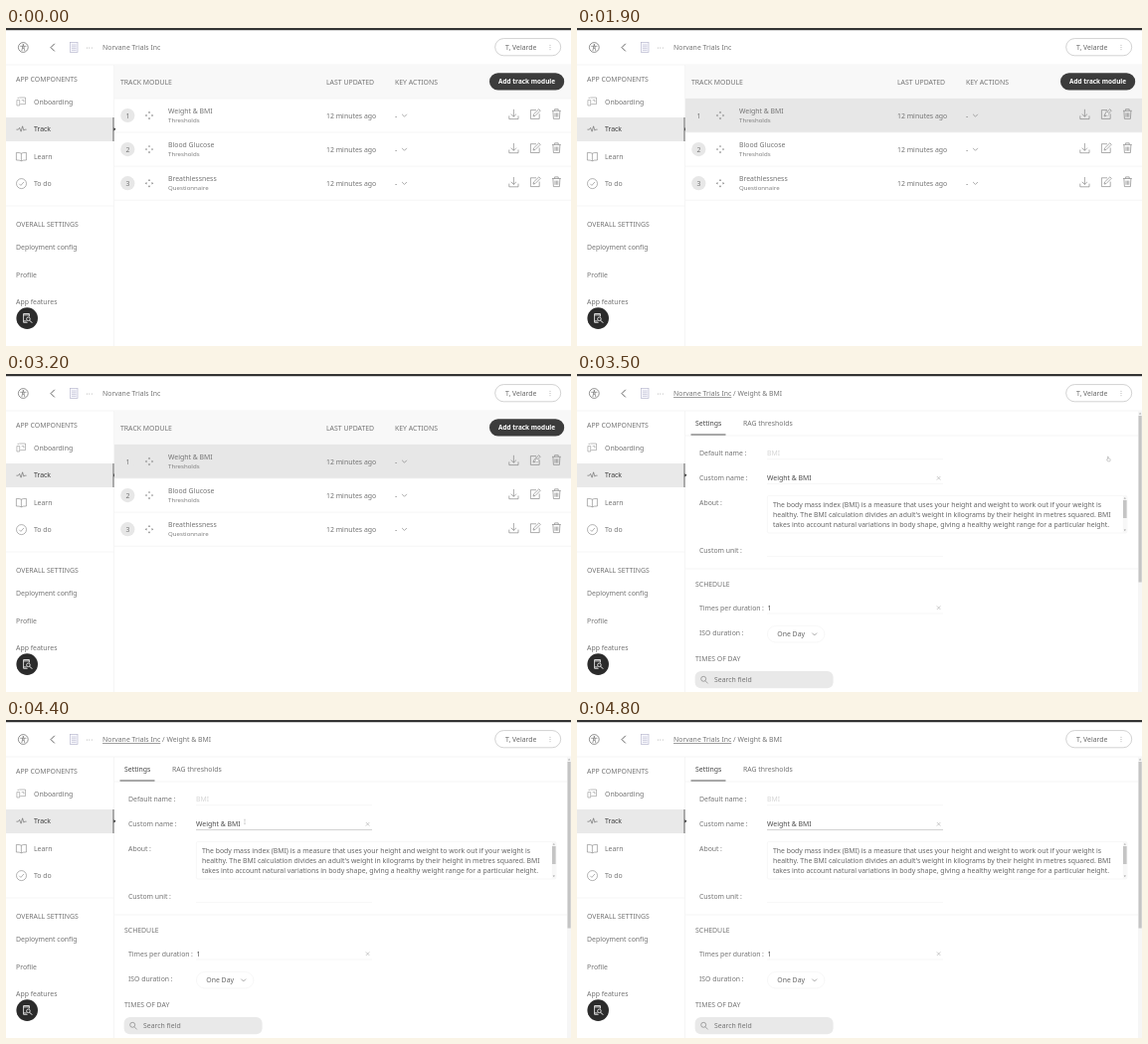
Write an HTML page that moves like this. It is 568 px wide and 320 px high and loops after 5000 ms.

```html
<!DOCTYPE html>
<html lang="en">
<head>
<meta charset="utf-8">
<title>Track modules</title>
<style>
html, body { margin: 0; width: 100%; height: 100%; overflow: hidden; background: #fff; }
svg { display: block; width: 100vw; height: 100vh; }
text { font: 6.9px "Noto Sans", "Open Sans", sans-serif; white-space: pre; }
</style>
</head>
<body>
<svg id="stage" viewBox="0 0 568 320"></svg>
<script>
const stage = document.getElementById('stage');
const LOOP = 5000, STEP = 100;
const ORG = 'Norvane Trials Inc', USER = 'T, Velarde';
const GREY = '#747474', DARK = '#4c4c4c', RULE = '#f1f1f1';

function add(parent, tag, attrs, content) {
  const el = document.createElementNS('http://www.w3.org/2000/svg', tag);
  for (const key in attrs) el.setAttribute(key, attrs[key]);
  if (content !== undefined) el.textContent = content;
  parent.appendChild(el);
  return el;
}
const group = (parent, x = 0, y = 0) => add(parent, 'g', { transform: `translate(${x} ${y})` });
const rect = (g, x, y, width, height, fill, more) => add(g, 'rect', { x, y, width, height, fill, ...more });
const disc = (g, cx, cy, r, fill, more) => add(g, 'circle', { cx, cy, r, fill, ...more });
const stroke = (g, d, color = GREY, width = 0.6, more) =>
  add(g, 'path', { d, fill: 'none', stroke: color, 'stroke-width': width, ...more });
const label = (g, x, y, text, color = GREY, size = 6.9, more = '') =>
  add(g, 'text', { x, y, style: `fill:${color};font-size:${size}px;${more}` }, text);
const field = (g, y, name) => add(label(g, 123, y, name), 'tspan', { dx: 1.5 }, ':');
const show = (el, on) => el.setAttribute('visibility', on ? 'visible' : 'hidden');
const rule = (g, x1, x2, y, color = RULE, width = 0.7) => stroke(g, `M${x1} ${y}H${x2}`, color, width);
const chevron = (g, x, y) => stroke(g, `M${x - 2.4} ${y - 1.2}l2.4 2.4 2.4-2.4`);
const cross = (g, x, y) => stroke(g, `M${x - 1.8} ${y - 1.8}l3.6 3.6m0-3.6l-3.6 3.6`, '#999', 0.5);

function drawHeader() {
  rect(stage, 0, 0, 568, 2.2, '#333');
  rule(stage, 0, 568, 37);
  const a = group(stage, 17.3, 19.5);
  disc(a, 0, 0, 4.9, 'none', { stroke: '#555', 'stroke-width': 0.65 });
  disc(a, 0, -2.6, 0.75, '#555');
  stroke(a, 'M-3.1-1.2H3.1M-.8-1.2V.6L-1.5 3.5M.8-1.2V.6L1.5 3.5M-.8 .8H.8', '#555', 0.55);
  stroke(stage, 'M48.8 15.8l-3.8 3.8 3.8 3.8', '#444', 0.85);
  rect(stage, 64.6, 14.6, 7.4, 9.8, '#f7f7fc', { stroke: '#b0b0c8', 'stroke-width': 0.6 });
  stroke(stage, 'M66 17h4.6m-4.6 1.8h4.6m-4.6 1.8h4.6m-4.6 1.8h4.6', '#a8a8c4', 0.5);
  for (const x of [81.4, 83.8, 86.2]) disc(stage, x, 20, 0.45, GREY);
  rect(stage, 491.7, 10.6, 66, 17.2, '#fff', { rx: 8.6, stroke: '#b4b4b4', 'stroke-width': 0.6 });
  label(stage, 502, 22, USER, '#666');
  for (const y of [17.3, 19.5, 21.7]) disc(stage, 547, y, 0.45, GREY);
}

function drawSidebar() {
  rule(stage, 0, 108, 179);
  stroke(stage, 'M108.5 37V320', RULE, 0.7);
  rect(stage, 0, 90, 108, 24, '#e9e9e9');
  rect(stage, 107.6, 90, 0.8, 24, '#444');
  add(stage, 'path', { d: 'M108.4 100.2l2 1.6-2 1.6z', fill: '#222' });
  label(stage, 10, 54.1, 'APP COMPONENTS');
  label(stage, 28, 76.8, 'Onboarding');
  label(stage, 28, 104.4, 'Track', '#3c3c3c');
  label(stage, 28, 132, 'Learn');
  label(stage, 28, 159.2, 'To do');
  label(stage, 10, 200.2, 'OVERALL SETTINGS');
  label(stage, 10, 222.7, 'Deployment config');
  label(stage, 10, 250.5, 'Profile');
  label(stage, 10, 278, 'App features');

  const board = group(stage, 15.3, 74);
  stroke(board, 'M-2-4H4.2V2.6H-1M-4.4-1.4h2.8v5.4h-2.8zM-3.8-3.6h1.6M.4-1.4h2.2v2', '#888', 0.55);
  stroke(stage, 'M10.4 102.2h2l1.2-1.8 1.5 3.8 1.5-5.4 1.3 4.4.8-1h1.9', '#555', 0.55);
  stroke(stage, 'M15.4 126.2q-2-1-5-.8v7.6q3-.2 5 .8q2-1 5-.8v-7.6q-3-.2-5 .8zV133.8', GREY, 0.55);
  disc(stage, 15.5, 156.6, 5, 'none', { stroke: GREY, 'stroke-width': 0.55 });
  stroke(stage, 'M13.3 156.8l1.6 1.6 3-3.4', GREY, 0.55);

  disc(stage, 21.2, 292.1, 10.8, '#2b2b2b');
  const phone = group(stage, 21.2, 292.1);
  stroke(phone, 'M2.2-1.6V-4.6H-3.6V4.2H.4M-3.6-3.2H2.2M-3.6 2.8H-.4', '#fff', 0.8);
  disc(phone, 1.2, 0.7, 1.8, 'none', { stroke: '#fff', 'stroke-width': 0.8 });
  stroke(phone, 'M2.5 2.1l2.5 2.5', '#fff', 1);
}

function drawRow(list, i, title, kind) {
  const g = group(list, 0, 71 + i * 34.1);
  const hover = rect(g, 109, 0, 459, 34, '#e7e7e7', { opacity: 0 });
  rule(g, 109, 568, 34);
  disc(g, 122.3, 17, 7.1, '#e7e7e7');
  label(g, 120.4, 19.5, i + 1);
  for (const turn of [0, 90, 180, 270])
    add(g, 'path', { d: 'M0-4.2l1.2 1.7h-2.4z', fill: '#808080', transform: `translate(144 17) rotate(${turn})` });
  label(g, 163, 14.5, title);
  label(g, 163, 24, kind, '#808080', 6.1);
  label(g, 322, 19.5, '12 minutes ago');
  label(g, 391, 19.5, '-');
  chevron(g, 400.5, 17);
  stroke(g, 'M510.4 10.8v7.4m-2.6-2.6l2.6 2.6 2.6-2.6M505.8 17.4v3.2h9.2v-3.2');
  stroke(g, 'M533 11.6H527.4V20.4H536.2V15.4M530 17.9l.6-2.2 5.2-5 1.4 1.5-5.1 5.1z');
  stroke(g, 'M549 12.3h8.8M551.6 12.2v-1.5h3.6v1.5M549.9 12.4l.5 8h6l.5-8M552 14.4v4.2m1.4-4.2v4.2m1.4-4.2v4.2');
  return hover;
}

function drawList() {
  const g = group(stage);
  label(g, 97, 22, ORG);
  rect(g, 109, 37.3, 459, 33.7, '#f8f8f8');
  rule(g, 109, 568, 71);
  label(g, 115, 56.5, 'TRACK MODULE');
  label(g, 322, 56.5, 'LAST UPDATED');
  label(g, 391, 56.5, 'KEY ACTIONS');
  rect(g, 486, 45.2, 75.2, 17.4, '#3c3c3c', { rx: 8.7 });
  label(g, 523.6, 56.3, 'Add track module', '#fff', 6.45, 'font-weight:700;text-anchor:middle');
  const hovers = [['Weight & BMI', 'Thresholds'], ['Blood Glucose', 'Thresholds'], ['Breathlessness', 'Questionnaire']]
    .map(([title, kind], i) => drawRow(g, i, title, kind));
  return { g, hovers };
}

function drawForm() {
  const g = group(stage);
  const crumb = label(g, 97, 22, '');
  add(crumb, 'tspan', { 'text-decoration': 'underline' }, ORG);
  add(crumb, 'tspan', {}, ' / Weight & BMI');

  label(g, 119, 52.2, 'Settings', '#444');
  label(g, 167, 52.2, 'RAG thresholds');
  rule(g, 109, 564, 62);
  rule(g, 114.5, 149.5, 61, '#555', 1);

  field(g, 82, 'Default name');
  label(g, 191, 82, 'BMI', '#d4d4d4');
  field(g, 107.3, 'Custom name');
  label(g, 191, 107.3, 'Weight & BMI', DARK);
  field(g, 131.6, 'About');
  field(g, 180.3, 'Custom unit');
  for (const y of [85.7, 110.5, 183.6, 241]) rule(g, 191, 368, y, RULE, 0.6);
  const focus = rule(g, 191, 368, 110.5, '#bbb', 0.6);
  cross(g, 363.6, 104.8);

  rect(g, 191.4, 122.4, 361.6, 37.6, 'none', { rx: 1.5, stroke: RULE, 'stroke-width': 0.6 });
  ['The body mass index (BMI) is a measure that uses your height and weight to work out if your weight is',
   "healthy. The BMI calculation divides an adult's weight in kilograms by their height in metres squared. BMI",
   'takes into account natural variations in body shape, giving a healthy weight range for a particular height.'
  ].forEach((line, i) => label(g, 197, 133.6 + i * 10.4, line, '#666', 6.89));
  rect(g, 548.8, 122.8, 4, 36.8, '#f7f7f7');
  rect(g, 549, 127, 3.6, 18, '#c4c4c4');
  add(g, 'path', { d: 'M549.7 125.6h2.2l-1.1-1.4zM549.7 156.6h2.2l-1.1 1.4z', fill: '#999' });

  rule(g, 109, 564, 196);
  label(g, 119, 214.3, 'SCHEDULE');
  field(g, 238, 'Times per duration');
  label(g, 191.4, 238, '1', DARK);
  cross(g, 363.6, 235.2);
  field(g, 263, 'ISO duration');
  rect(g, 191.4, 253.6, 57.4, 16.4, '#fff', { rx: 8.2, stroke: RULE, 'stroke-width': 0.6 });
  label(g, 201.3, 264.3, 'One Day', '#666');
  chevron(g, 238.7, 261.8);
  label(g, 119, 289.1, 'TIMES OF DAY');
  rect(g, 118.6, 299, 139, 17.2, '#e9e9e9', { rx: 6 });
  disc(g, 127.2, 306.8, 2.5, 'none', { stroke: GREY, 'stroke-width': 0.6 });
  stroke(g, 'M129 308.7l2.6 2.7');
  label(g, 138, 310.2, 'Search field');

  rect(g, 564, 37.3, 4, 282.7, '#f6f6f6');
  rect(g, 564.5, 42, 3.2, 167.5, '#c4c4c4');
  add(g, 'path', { d: 'M564.9 40.4h2.4l-1.2-1.6z', fill: '#aaa' });
  return { g, focus };
}

drawHeader();
drawSidebar();
const list = drawList();
const form = drawForm();
const hand = group(stage);
add(hand, 'path', {
  d: 'M-1.2-2.8q.6-.5 1 0V-.6L1.7-.2Q2.3 0 2.1.8L1.6 2.7H-.9L-2.2.8Q-2.2 0-1.2.5z',
  fill: '#fff', stroke: '#888', 'stroke-width': 0.5, transform: 'scale(.85)'
});
const beam = group(stage);
stroke(beam, 'M-.8-2.2H.8M0-2.2V2.2M-.8 2.2H.8', '#aaa', 0.45);

const bend = (a, b, c, t) => a * (1 - t) ** 2 + 2 * b * t * (1 - t) + c * t * t;
const place = (el, x, y) => el.setAttribute('transform', `translate(${x} ${y})`);

function render(ms) {
  const t = Math.floor(ms / STEP) * STEP;
  const editing = t >= 3500, typing = t >= 4400;
  show(list.g, !editing);
  show(form.g, editing);

  // the highlight passes from the second row to the first in two steps
  const first = t < 1800 ? 0 : t < 1900 ? 0.5 : 1;
  list.hovers[0].setAttribute('opacity', first);
  list.hovers[1].setAttribute('opacity', t < 1500 ? 0 : 1 - first);
  show(form.focus, typing);

  show(hand, t >= 1900 && !typing);
  show(beam, typing && t < 4800);
  if (!editing) {
    place(hand, t < 2600 ? 533 : 533.6, t < 2600 ? 85.6 : 86.2);
  } else if (!typing) {
    const p = Math.max(0, (t - 3800) / 600);
    place(hand, bend(534.4, 390, 240, p), bend(85.6, 16, 102.4, p));
  } else {
    place(beam, 240 - (t - 4400) / 20, t < 4500 ? 102.4 : 104);
  }
}

const start = performance.now();
function tick() {
  render((performance.now() - start) % LOOP);
  requestAnimationFrame(tick);
}
render(0);
requestAnimationFrame(tick);
</script>
</body>
</html>
```
